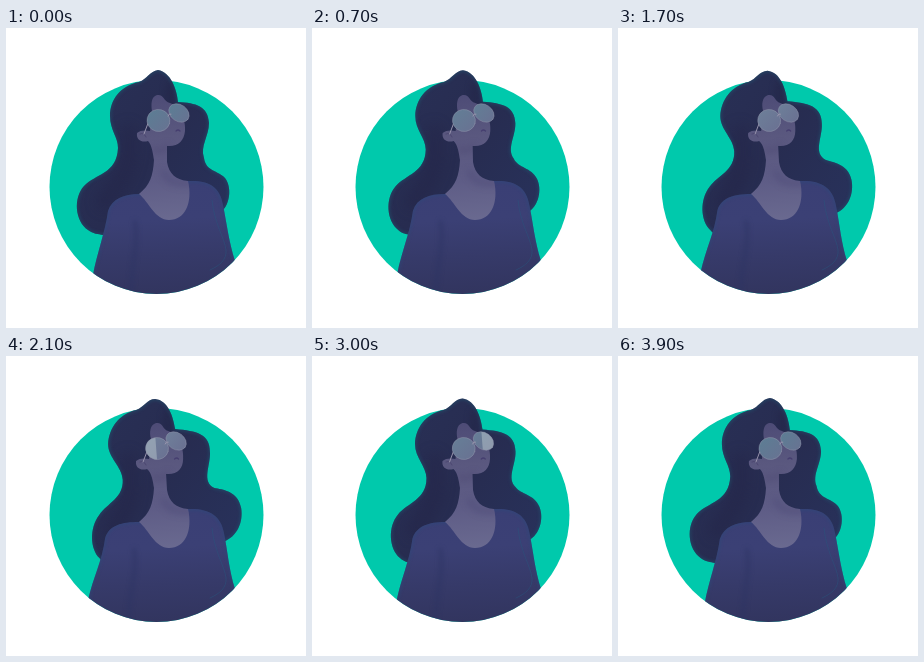
Write an HTML page with a canvas that moves like this. It is 300 px wide and 300 px high and loops after 4000 ms.

```html
<!DOCTYPE html>
<html>
<head>
<meta charset="utf-8">
<style>
  html, body { margin: 0; width: 100%; height: 100%; overflow: hidden; background: #fff }
  canvas { display: block; width: 300px; height: 300px }
</style>
</head>
<body>
<canvas id="stage"></canvas>
<script>
const LOOP = 4000, STEP = 100;
const canvas = document.getElementById('stage');
const ctx = canvas.getContext('2d');
const ratio = window.devicePixelRatio || 1;
canvas.width = canvas.height = 300 * ratio;

const lerp = (a, b, k) => a + (b - a) * k;

// Blends two paths that share the same commands.
function morph(a, b, k) {
  const ends = b.match(/-?[\d.]+/g);
  let i = 0;
  return new Path2D(a.replace(/-?[\d.]+/g, n => lerp(+n, +ends[i++], k).toFixed(2)));
}

function gradient(x0, y0, x1, y1, ...colors) {
  const g = ctx.createLinearGradient(x0, y0, x1, y1);
  colors.forEach((c, i) => g.addColorStop(i / (colors.length - 1), c));
  return g;
}

function within(path, draw) {
  ctx.save();
  ctx.clip(path);
  draw();
  ctx.restore();
}

function line(path, color, width, blur = 0) {
  ctx.save();
  if (blur) ctx.filter = `blur(${blur * ratio}px)`;
  ctx.strokeStyle = color;
  ctx.lineWidth = width;
  ctx.lineCap = 'round';
  ctx.stroke(typeof path === 'string' ? new Path2D(path) : path);
  ctx.restore();
}

function fill(path, color) {
  ctx.fillStyle = color;
  ctx.fill(path);
}

const disc = new Path2D();
disc.arc(150.5, 159, 107, 0, 7);

const hairLeft = 'M152 42 C144 43 141 51 133 54 C114 58 104 72 104 88 C104 102 112 109 112 120 C111 146 89 146 78 158 C67 170 69 193 82 202 C87 206 92 206 97 207 L160 200 ';
const hairLeftEnd = 'M149 43 C141 43 138 51 130 54 C113 58 103 72 102 88 C102 102 116 110 117 124 C118 142 102 147 94 159 C84 172 85 193 94 202 C96 205 98 206 101 207 L160 200 ';
const hairRight = 'L216 183 C224 176 226 159 219 150 C212 142 200 144 198 130 C194 118 203 108 203 95 C202 78 190 75 172 74 C171 62 165 44 152 42 Z';
const hairRightEnd = 'L217 186 C232 181 238 166 236 152 C233 134 217 133 209 132 C195 126 205 109 204 96 C204 78 191 75 169 73 C167 61 162 44 149 43 Z';

const body = 'M133 166 C118 166 106 171 102 183 C99 205 91 225 87 247 L100 275 L215 275 L229 233 C223 214 221 197 217 177 C214 158 202 152 182 153 Z';
const bodyEnd = 'M133 166 C116 166 103 169 99 182 C96 205 87 221 82 243 L100 275 L215 275 L229 233 C223 214 222 197 218 177 C215 159 202 152 182 153 Z';

const head = 'M151 67 C145 69 145 76 146 83 L144 103 C140 102 134 102 131 105 C130 112 136 115 142 113 C146 117 147 126 148 132 C147 148 144 157 133 166 C143 174 149 192 163 192 C179 192 187 175 182 153 C170 152 163 146 161 134 L161 118 C172 119 178 113 179 103 C180 95 176 79 164 75 C157 73 158 66 151 67 Z';
const headEnd = 'M150 67 C144 69 143 76 145 83 L143 103 C139 102 133 102 130 105 C129 112 135 115 141 113 C146 117 147 126 148 132 C147 148 144 157 133 166 C143 174 149 192 163 192 C179 192 187 175 182 153 C170 152 163 146 161 134 L160 118 C171 119 177 113 177 103 C178 95 174 79 162 75 C156 73 157 66 150 67 Z';

function drawHair(k) {
  const hair = morph(hairLeft + hairRight, hairLeftEnd + hairRightEnd, k);
  fill(hair, gradient(80, 60, 230, 170, '#293056', '#272c50', '#28315a'));
  within(hair, () => {
    line(hair, 'rgba(34,82,112,.55)', 3, 1.5);
    line(morph('M164 58 C164 68 161 75 166 80', 'M161 58 C161 68 159 75 164 80', k), 'rgba(34,36,70,.5)', 7, 3);
    line(morph('M122 104 C130 140 108 160 98 174', 'M122 104 C130 140 116 160 107 174', k), 'rgba(35,36,70,.4)', 16, 6);
  });
}

function drawHead(k) {
  const face = morph(head, headEnd, k);
  fill(face, gradient(150, 66, 160, 194, '#4d4b76', '#5a587f', '#5e5c86', '#6a6a90'));
  within(face, () => {
    line('M148 121 C153 124 158 122 162 118', 'rgba(65,61,104,.3)', 5, 3);
    line('M158 145 C166 158 173 155 185 155', 'rgba(73,70,115,.35)', 7, 3);
  });
  line('M134 106 Q138 104 140 109', 'rgba(67,58,103,.5)', 1, .4);
  const shift = lerp(0, -1.5, k);
  line(`M${170 + shift} 103 Q${172 + shift} 101 ${174 + shift} 103`, '#463f70', 1.2, .3);
}

function drawBody(k) {
  const top = morph(body, bodyEnd, k);
  fill(top, gradient(150, 155, 156, 265, '#3a3f75', '#3b4075', '#363a69', '#32355f'));
  within(top, () => {
    line(top, 'rgba(44,73,122,.55)', 3, 1.5);
    line(morph('M129 194 C133 215 126 229 125 265', 'M128 194 C132 215 124 229 122 265', k), 'rgba(44,51,100,.5)', 4, 2);
    line('M206 172 C208 195 219 211 220 222 C221 232 213 238 204 242', 'rgba(43,86,126,.5)', 1, .5);
  });
}

function lens(x, y, rx, ry, tilt, k, time) {
  const path = new Path2D();
  path.ellipse(x, y, rx, ry, tilt, 0, 7);
  const tone = (a, b) => `rgb(${a.map((v, i) => Math.round(lerp(v, b[i], k)))})`;
  fill(path, gradient(x - rx, y - ry, x + rx, y + ry,
    tone([91, 126, 148], [112, 128, 154]), tone([104, 114, 146], [106, 112, 146])));
  within(path, () => {
    // A soft glare crosses both lenses from left to right.
    const glare = 144 + (time - 2100) * .035;
    const edge = `M${glare - 1} 70 L${glare + 2} 110`;
    line(edge, 'rgba(190,204,208,.45)', 11, .6);
  });
  line(path, 'rgba(145,151,171,.6)', .8);
}

function drawGlasses(k, time) {
  const x = lerp(0, -3, k);
  line(`M${142.5 + x / 3} 94 L${138 + x / 3} 106`, '#9793ac', 1);
  lens(173 + x, 85, 11, 8.3, .6, k, time);
  lens(152.5 + x / 2, 92.5, 11.5, 11, .25, k, time);
  line(`M${162 + x} 88 Q${163 + x} 85 ${165 + x} 86`, '#9995ad', 1);
}

function draw(time) {
  const t = Math.floor(time % LOOP / STEP) * STEP;
  const k = 1 - Math.abs(t / (LOOP / 2) - 1);
  ctx.setTransform(ratio, 0, 0, ratio, 0, 0);
  ctx.fillStyle = '#fff';
  ctx.fillRect(0, 0, 300, 300);
  fill(disc, '#00c9ac');
  drawHair(k);
  within(disc, () => drawBody(k));
  drawHead(k);
  drawGlasses(k, t);
}

const start = performance.now();
function tick() {
  draw(performance.now() - start);
  requestAnimationFrame(tick);
}
tick();
</script>
</body>
</html>
```
